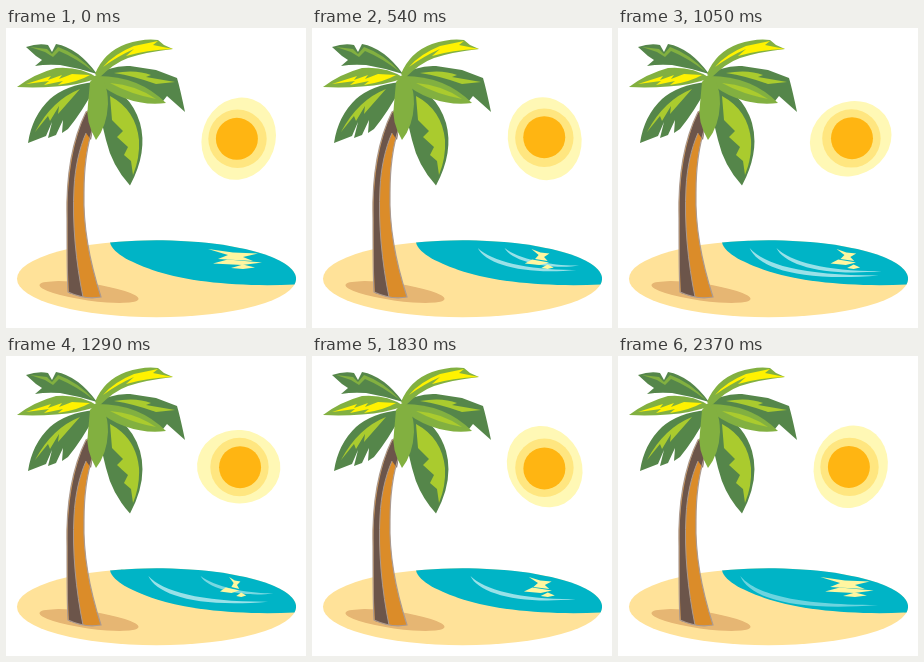
An HTML page for the animation above (2400 ms loop, 300 px wide and 300 px high).

```html
<!DOCTYPE html>
<html lang="en">
<head>
<meta charset="utf-8">
<title>Palm beach</title>
<style>
html, body { margin: 0; width: 100%; height: 100%; overflow: hidden; background: #fff; }
svg { display: block; width: 100vw; height: 100vh; }
.dark { fill: #55864a; }
.mid { fill: #82b040; }
.light { fill: #aacb2e; }
.yellow { fill: #fff200; }
</style>
</head>
<body>
<svg viewBox="0 0 300 300">
  <defs>
    <clipPath id="sea"><path id="seaShape" d="M104 214.5A139.5 38.5 0 0 1 288.5 256.5C235 259 184 254 151 243.5C126 235 107 226 104 214.5Z"/></clipPath>
  </defs>

  <ellipse id="halo" rx="36.7" ry="41.7" fill="#fff8b5"/>
  <circle id="ring" r="29.2" fill="#ffe680"/>
  <circle id="core" r="21" fill="#ffb512"/>

  <ellipse cx="150.5" cy="250.8" rx="139.5" ry="38.5" fill="#ffe299"/>
  <use href="#seaShape" fill="#00b4c6"/>
  <g id="waves" clip-path="url(#sea)" fill="#fff"></g>
  <g id="glints" fill="#fff6a0"></g>

  <ellipse rx="50" ry="8.5" fill="#e6b673" transform="translate(83 264) rotate(8)"/>
  <g id="trunk">
    <path id="bark" fill="#db8c29" d="M80 84C66 112 60 150 61 190C61 225 61 248 62 264Q79 272 95 269C84 235 77 200 78 165C78 140 80 120 87 100L84 82Z"/>
    <path fill="#6c554a" d="M80 85C67 112 61 150 61.5 190C61.5 225 62 250 63 265L77 269C70 235 66 195 68 160C69 140 73 121 80 105L85 112 87 99 84 82Z"/>
    <use href="#bark" style="fill-opacity:0" stroke="#ab9a90" stroke-width="1.2"/>
    <path fill="none" stroke="#ab9a90" d="M77 269C70 235 66 195 68 160C69 140 73 121 80 105"/>
  </g>
  <g id="fronds">
    <path class="dark" d="M20 19Q32 15 42 17L46 24 50 16Q72 20 91 46Q72 40 54 37Q40 36 29 38L36 32 30 28Z"/>
    <path class="mid" d="M24 19L41 21 46 26 52 19Q72 26 88 44Q70 30 53 23L47 29 39 24Z"/>
    <path class="dark" d="M88 54Q60 57 44 71Q26 88 22 115L40 108 46 94 42 110 50 107 57 92 56 105 62 101Q76 84 90 58Z"/>
    <path class="light" d="M74 61Q46 72 29 104L42 88 44 93 53 78 52 86Z"/>
    <path class="dark" d="M90 53Q124 62 134 95Q142 124 124 157.5Q106 138 100 112Q92 82 90 53Z"/>
    <path class="light" d="M104 68Q130 82 133 112Q134 130 127 147L125 133 118 127 122 119 111 109 117 103 106 92Z"/>
    <path class="dark" d="M88 49Q104 37 124 38L150 42 171 50Q174 60 179 84L161 68 157 73Q140 62 91 53Z"/>
    <path class="light" d="M108 45Q130 41 145 47L140 49 169 54 150 56Q128 48 108 45Z"/>
    <path class="mid" d="M89 48Q132 47 160 75Q140 78 118 70Q102 64 89 52Z"/>
    <path class="light" d="M104 55Q130 57 150 71Q124 66 104 55Z"/>
    <path class="mid" d="M89 46Q98 24 120 16Q138 10 152 12L158 17 167 21Q140 24 122 30Q108 35 93 50Z"/>
    <path class="yellow" d="M97 39Q108 26 128 18L152 13 147 17 167 21Q140 22 120 28L128 21Q112 28 97 39Z"/>
    <path class="mid" d="M11 59Q28 46 50 40Q74 38 92 50Q74 57 50 58.5Q30 60 11 59Z"/>
    <path class="yellow" d="M20 56L45 48 42 52 56 47 53 51 66 46 84 47Q72 54 52 57L57 53 38 57 43 53Z"/>
    <path class="mid" d="M84 54L90 47 98 54Q102 62 102 76Q101 98 90 112Q79 93 82 76Z"/>
  </g>
</svg>
<script>
const LOOP = 2400;
const TAU = 2 * Math.PI;
const waves = [0, 400, 1180].map(start => ({ start }));

// Outlines use x from 0 to 1 between the left and right ends,
// which move out from the resting ends by "reach" on every pulse.
const glints = [
  { shape: [[0, 221], [.5, 224.5], [1, 225.5], [.7, 229], [.9, 233], [.2, 231], [.4, 227]],
    ends: [214, 242], reach: [12, 10] },
  { shape: [[0, 235.5], [.3, 231.5], [1, 234.5], [.6, 237]],
    ends: [211, 243], reach: [4, 13] },
  { shape: [[0, 240], [.5, 236.5], [1, 239.5], [.5, 241]],
    ends: [228, 244], reach: [3, 5] }
];

const $ = id => document.getElementById(id);
const clamp = v => Math.max(0, Math.min(1, v));

function addPath(parent) {
  return parent.appendChild(document.createElementNS("http://www.w3.org/2000/svg", "path"));
}
for (const wave of waves) wave.node = addPath($("waves"));
for (const glint of glints) glint.node = addPath($("glints"));

function drawSun(p) {
  const angle = Math.PI + TAU * p;
  const offset = r => `translate(${232.5 + r * Math.cos(angle)} ${110.8 + r * Math.sin(angle)})`;
  // The halo turns fast at first, then slows down.
  const turn = 20 + 360 * (p + .5 * Math.sqrt(p) * (1 - p));
  $("halo").setAttribute("transform", `translate(232.7 110.7) rotate(${turn})`);
  $("ring").setAttribute("transform", offset(1));
  $("core").setAttribute("transform", offset(1.6));
}

function drawWave({ node, start }, t) {
  const age = t - start;
  const x = 202 - age * .067;
  const k = (202 - x) / 80;
  node.setAttribute("d", `M${x} 220C${x + 14} ${231 + 6 * k} ${x + 52} ${237 + 12 * k} ${268 - 8 * k} ${236 + 13 * k}
    C${x + 48} ${240 + 16 * k} ${x + 8} ${234 + 6 * k} ${x} 220Z`);
  node.setAttribute("opacity", .6 * clamp(age / 140) * clamp((1290 - age) / 140));
}

function drawGlint({ node, shape, ends, reach }, p) {
  const pulse = Math.cos(3 * TAU * p);
  const left = ends[0] - reach[0] * pulse;
  const right = ends[1] + reach[1] * pulse;
  node.setAttribute("d", "M" + shape.map(([u, y]) => `${left + (right - left) * u} ${y}`).join("L") + "Z");
}

function frame() {
  const t = Math.floor(performance.now() % LOOP / 30) * 30;
  drawSun(t / LOOP);
  waves.forEach(wave => drawWave(wave, t));
  glints.forEach(glint => drawGlint(glint, t / LOOP));
  requestAnimationFrame(frame);
}
frame();
</script>
</body>
</html>
```
